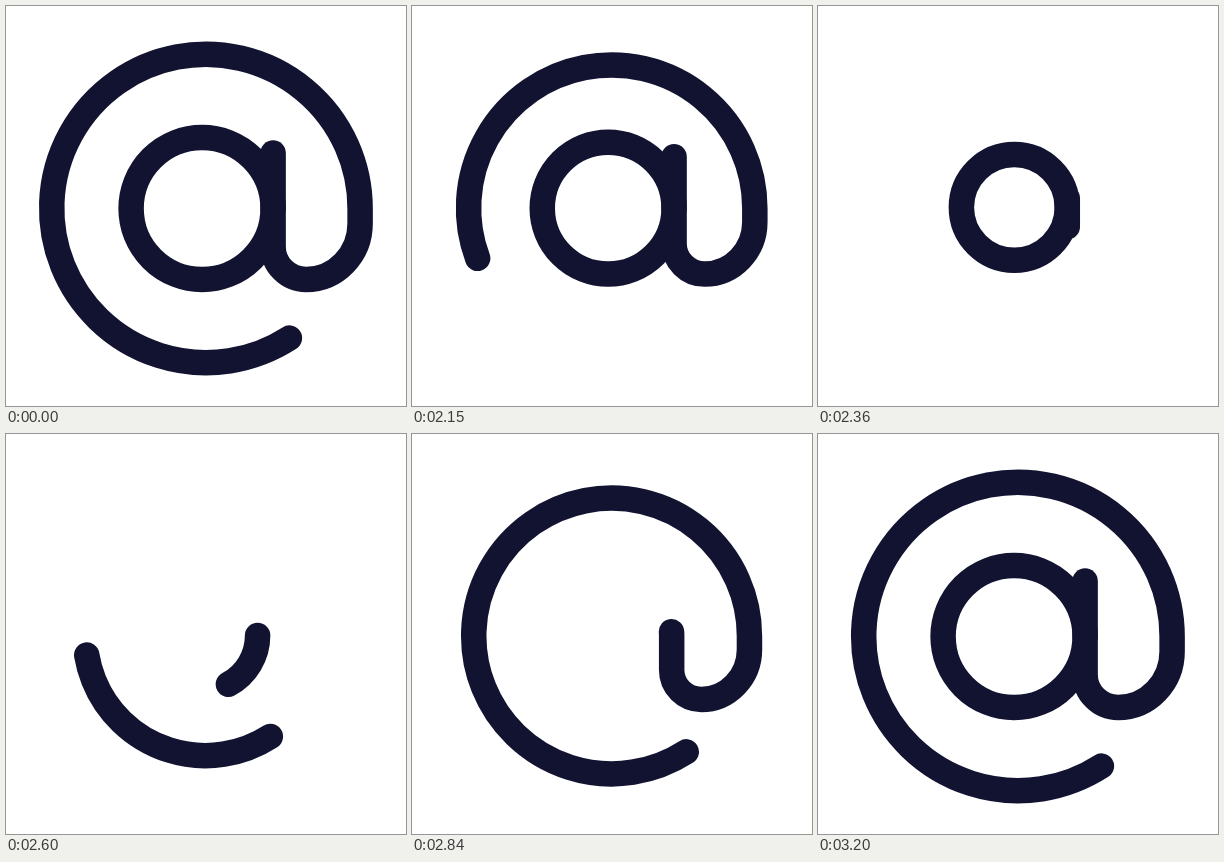
An HTML page that plays this animation: 400x400 px, repeating every 3.26 s.

```html
<!DOCTYPE html>
<html lang="en">
<head>
<meta charset="utf-8">
<title>At sign</title>
<style>
  html, body { margin: 0; width: 100%; height: 100%; overflow: hidden; background: #fff; }
  svg { display: block; width: 100%; height: 100%; }
  path { fill: none; stroke: #121331; stroke-linecap: round; stroke-linejoin: round; }
</style>
</head>
<body>
<svg viewBox="0 0 400 400">
  <defs>
    <!-- outer ring, hook, stem, then the inner ring, in one stroke -->
    <path id="sign" d="M283.4 332.1A154.2 154.2 0 1 1 354.1 202.5V217.5A54 56 0 0 1 300.1 273.5A33 33 0 0 1 267.1 240.5V202.5A71 71 0 1 0 125.1 202.5A71 71 0 1 0 267.1 202.5"/>
  </defs>
  <g id="icon">
    <path id="tail"/>
    <path id="head"/>
    <path id="stem"/>
  </g>
</svg>
<script>
const LOOP = 3260, REST = 2000, STEP = 30, LAST = 40;
const WIDTH = 25.5, SMALL = 0.73, CX = 197, CY = 198;
const STEM_X = 267.1, STEM_Y = 202.5, STEM_H = 55.5;

const $ = id => document.getElementById(id);
const icon = $('icon'), tail = $('tail'), head = $('head'), stem = $('stem');
const d = $('sign').getAttribute('d');
tail.setAttribute('d', d);
head.setAttribute('d', d);
const length = tail.getTotalLength();

// Progress from step `from` to step `to`, eased by cubic-bezier(a, 0, b, 1).
function ease(k, from, to, a = 1 / 3, b = 2 / 3) {
  const x = Math.min(1, Math.max(0, (k - from) / (to - from)));
  if (x === 0 || x === 1) return x;
  let lo = 0, hi = 1;
  for (let i = 0; i < 30; i++) {
    const s = (lo + hi) / 2, u = 1 - s;
    if (3 * u * u * s * a + 3 * u * s * s * b + s * s * s < x) lo = s;
    else hi = s;
  }
  return lo * lo * (3 - 2 * lo);
}

function show(el, on) {
  el.style.display = on ? '' : 'none';
}

// Show only the part of the stroke between two fractions.
function trim(el, start, end) {
  show(el, end > start);
  if (start === 0 && end === 1) {
    el.removeAttribute('stroke-dasharray');
    return;
  }
  el.setAttribute('stroke-dasharray', `${(end - start) * length} ${length * 2}`);
  el.setAttribute('stroke-dashoffset', -start * length);
}

function draw(time) {
  let k = Math.max(0, Math.floor((time % LOOP - REST) / STEP));
  if (k >= LAST) k = 0;

  const scale = k < 14.5
    ? 1 - (1 - SMALL) * ease(k, 0.4, 14)
    : SMALL + (1 - SMALL) * ease(k, 15, LAST, 0.167, 0.667);
  icon.setAttribute('transform',
    `translate(${CX} ${CY}) scale(${scale}) translate(${-CX} ${-CY})`);
  icon.setAttribute('stroke-width', WIDTH / scale);

  trim(tail, ease(k, 0.5, 26.5, 0.219, 0.335), 1);
  trim(head, 0, ease(k, 15, LAST, 0.19, 0.492));

  const rise = k < 20 ? 1 - ease(k, 5, 15) : ease(k, 28, 39);
  show(stem, rise > 0);
  stem.setAttribute('d', `M${STEM_X} ${STEM_Y}V${STEM_Y - STEM_H * rise}`);
}

const t0 = performance.now();
function tick() {
  draw(performance.now() - t0);
  requestAnimationFrame(tick);
}
tick();
</script>
</body>
</html>
```
